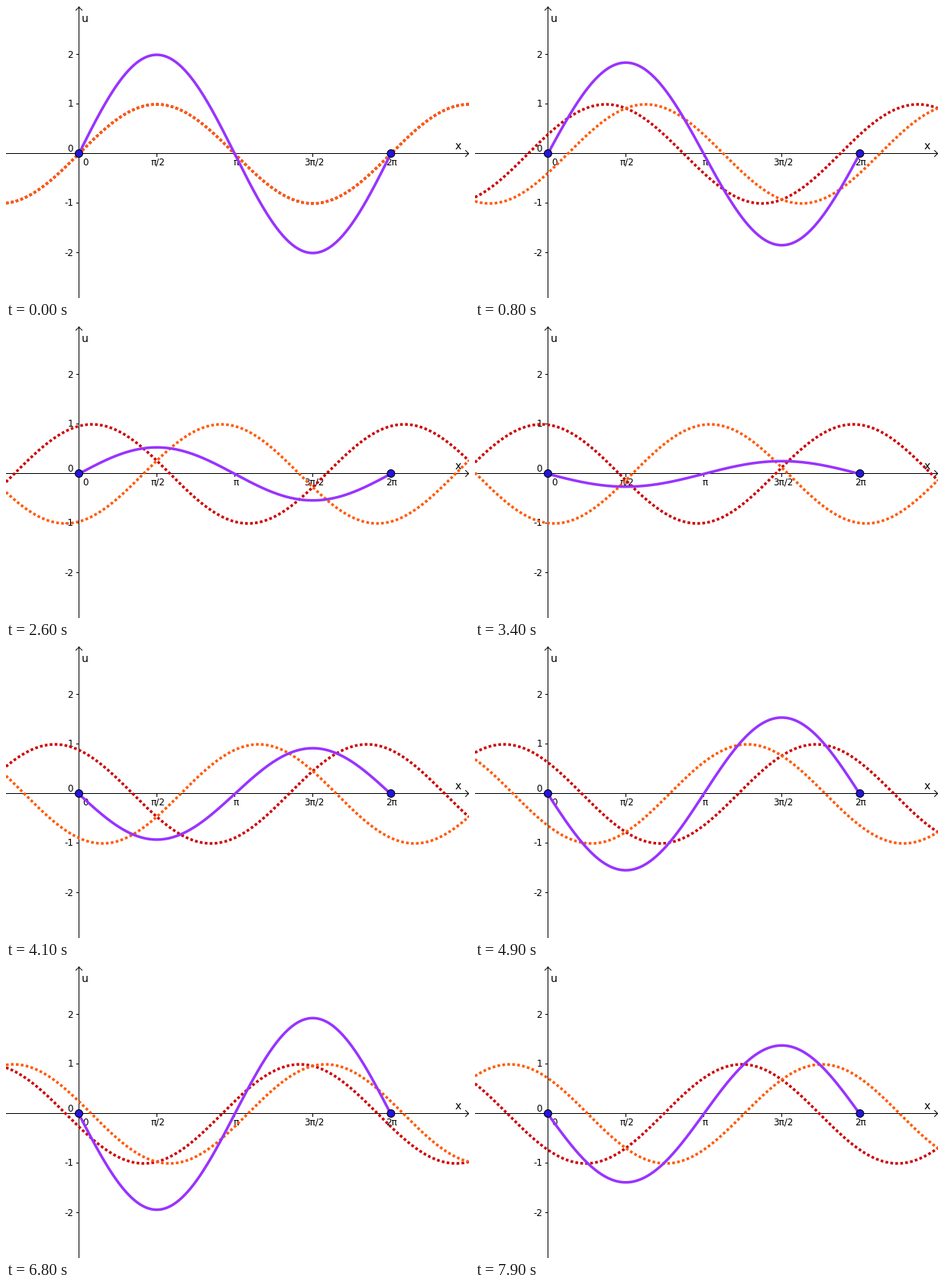
These frames come from a looping animation (606 by 383 pixels, 8 s). A matplotlib script:

```python
import numpy as np
import matplotlib.pyplot as plt
from matplotlib.animation import FuncAnimation
from matplotlib.patches import Circle

W, H, DPI = 606, 383, 100
PX = 72 / DPI               # points per pixel
OX, OY, UNIT = 95.5, 193.5, 65
CURVE_X, CURVE_Y = 95.2, 194  # curves sit slightly off the pixel-aligned axes
FRAMES, INTERVAL = 80, 100
PHASE_STEP = 0.05

plt.rcParams["font.family"] = "DejaVu Sans"
fig = plt.figure(figsize=(W / DPI, H / DPI), dpi=DPI, facecolor="white")
ax = fig.add_axes([0, 0, 1, 1])
ax.set(xlim=(0, W), ylim=(H, 0))
ax.axis("off")


def stroke(xs, ys, color="black", width=1, **kw):
    return ax.plot(xs, ys, color=color, lw=width * PX, snap=False, **kw)[0]


def label(x, base, text, size=12, ha="center"):
    ax.text(x, base, text, fontsize=size * PX, ha=ha, va="baseline", zorder=2)


def draw_axes():
    stroke([0, W], [OY, OY])
    stroke([OX, OX], [1, H])
    stroke([W - 4.5, W - 0.5, W - 4.5], [OY - 4, OY, OY + 4])
    stroke([OX - 4, OX, OX + 4], [5.5, 1.5, 5.5])
    for n in (-2, -1, 1, 2):
        y = OY - n * UNIT
        stroke([OX - 3, OX], [y, y])
        label(88, y + 4, str(n), ha="right")
    for k, text in enumerate(("π/2", "π", "3π/2", "2π"), 1):
        x = np.floor(OX + k * np.pi / 2 * UNIT) + 0.5
        stroke([x, x], [OY, OY + 4])
        label(x + 1.5, 209, text)
    label(104, 209, "0")
    label(88, 191, "0", ha="right")
    label(99, 21, "u", 14, "left")
    label(592, 188.5, "x", 14)


def wave_line(xs, color, zorder, **kw):
    return stroke(xs, np.full_like(xs, OY), color, 3.5, zorder=zorder, **kw)


def angle(px):
    return (px - CURVE_X) / UNIT


def height(u):
    return CURVE_Y - UNIT * u


draw_axes()
wide = np.linspace(0, W, 607)
span = np.linspace(CURVE_X, CURVE_X + 2 * np.pi * UNIT, 300)
# Dash lengths are multiples of the line width
dots = dict(linestyle=(0, (1, 3 / 3.5)), dash_capstyle="butt")
left_wave = wave_line(wide, "#cc0000", 3, **dots)
right_wave = wave_line(wide, "#ff5a0a", 4, **dots)
total = wave_line(span, "#9933ff", 5, solid_capstyle="butt")
for x in (OX, OX + 2 * np.pi * UNIT):
    ax.add_patch(Circle((x, OY), 5, fc="#2414dc", ec="black", lw=PX,
                        snap=False, zorder=6))


def update(i):
    t = i * PHASE_STEP
    left_wave.set_ydata(height(np.sin(angle(wide) + t)))
    right_wave.set_ydata(height(np.sin(angle(wide) - t)))
    total.set_ydata(height(2 * np.cos(t) * np.sin(angle(span))))
    return left_wave, right_wave, total


anim = FuncAnimation(fig, update, frames=FRAMES, interval=INTERVAL,
                     repeat=True, repeat_delay=0, blit=False)
plt.show()
```
